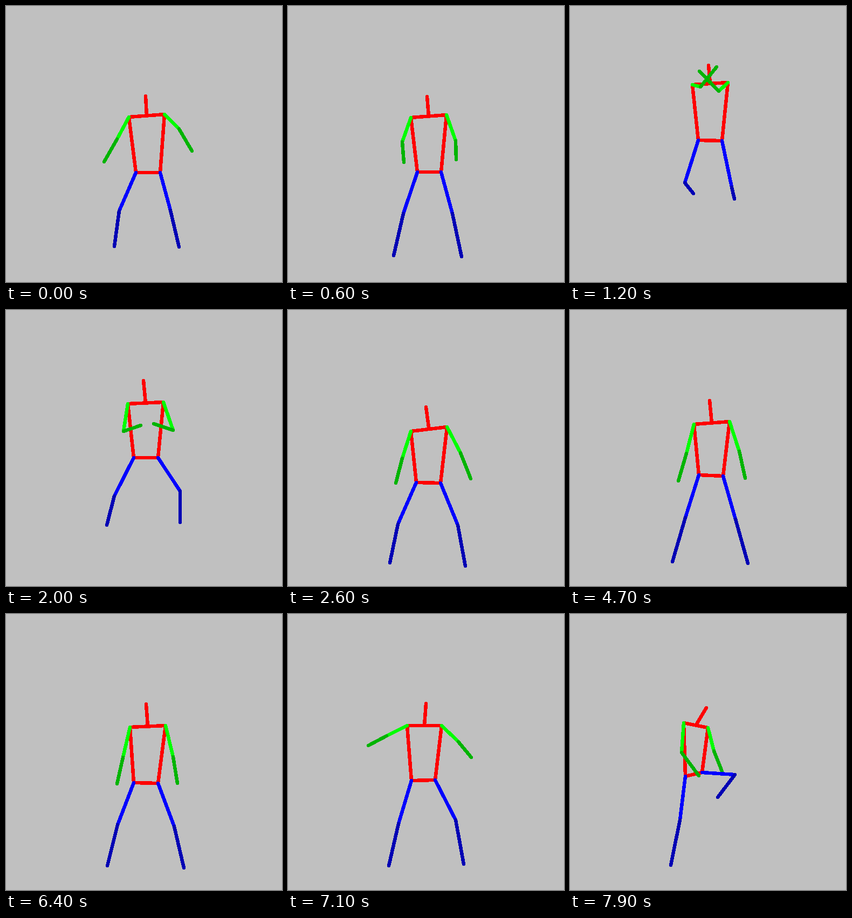
Animation of 512 by 512 pixels, one loop 8 s. Source, as an HTML page:

```html
<!DOCTYPE html>
<html lang="en">
<head>
<meta charset="utf-8">
<title>Stick figure</title>
<style>
  html, body { margin: 0; width: 100%; height: 100%; overflow: hidden; background: #c0c0c0; }
  svg { display: block; width: 100vw; height: 100vh; }
  line { stroke-width: 6.5; stroke-linecap: round; shape-rendering: crispEdges; }
</style>
</head>
<body>
<svg id="stage" viewBox="0 0 512 512"></svg>
<script>
const LOOP = 8000, STEP = 100;
const tracks = {};

// Ballistic height of the body during the jump.
const lift = t => Math.max(0, 62 * (1 - ((t - 1450) / 850) ** 2));

function addKey(joint, t, x, y) {
  (tracks[joint] ||= []).push({ t, x, y: y + lift(t) });
}

// Paired joints are given as left x, y, right x, y.
function pose(t, joints) {
  for (const [name, [x, y, x2, y2]] of Object.entries(joints)) {
    if (x2 === undefined) addKey(name, t, x, y);
    else {
      addKey(name + 'L', t, x, y);
      addKey(name + 'R', t, x2, y2);
    }
  }
}

pose(0, {
  head: [259, 167], shoulder: [228, 206, 294, 201], elbow: [206, 247, 321, 228],
  wrist: [182, 289, 345, 269], hip: [241, 309, 286, 309],
  knee: [210, 380, 305, 379], ankle: [201, 446, 321, 447]
});
pose(300, {
  head: [259, 186], shoulder: [229, 226, 294, 222], elbow: [207, 268, 319, 260],
  wrist: [200, 309, 325, 303], hip: [240, 322, 285, 322],
  knee: [207, 396, 310, 396], ankle: [198, 464, 323, 466]
});
pose(600, {
  head: [258, 168], shoulder: [228, 207, 294, 202], elbow: [212, 252, 311, 250],
  wrist: [215, 290, 312, 285], hip: [240, 308, 284, 308],
  knee: [214, 385, 305, 385], ankle: [196, 463, 322, 465]
});
pose(900, {
  head: [257, 130], shoulder: [227, 168, 293, 164], elbow: [222, 208, 303, 208],
  wrist: [245, 190, 268, 188], hip: [239, 271, 283, 271],
  knee: [215, 348, 300, 353], ankle: [197, 425, 318, 440]
});
pose(1200, {
  head: [257, 110], shoulder: [227, 146, 293, 142], elbow: [242, 150, 276, 158],
  wrist: [272, 113, 240, 121], hip: [238, 249, 282, 250],
  knee: [213, 328, 300, 336], ankle: [229, 348, 305, 358]
});
pose(2000, {
  head: [255, 131], shoulder: [226, 174, 292, 171], elbow: [218, 225, 310, 223],
  wrist: [250, 214, 274, 211], hip: [237, 274, 282, 274],
  knee: [201, 345, 323, 336], ankle: [187, 399, 323, 394]
});
pose(2300, {
  head: [256, 168], shoulder: [227, 212, 294, 207], elbow: [210, 262, 318, 258],
  wrist: [196, 300, 341, 290], hip: [238, 311, 283, 311],
  knee: [206, 387, 315, 385], ankle: [188, 462, 326, 468]
});
pose(2550, {
  head: [256, 181], shoulder: [228, 225, 295, 218], elbow: [212, 275, 320, 266],
  wrist: [200, 321, 340, 313], hip: [238, 321, 283, 322],
  knee: [204, 398, 315, 399], ankle: [189, 469, 329, 475]
});
pose(2900, {
  head: [255, 170], shoulder: [229, 215, 296, 205], elbow: [215, 269, 318, 253],
  wrist: [202, 320, 334, 305], hip: [239, 309, 284, 311],
  knee: [210, 387, 309, 391], ankle: [190, 468, 329, 471]
});
pose(3400, {
  head: [256, 167], shoulder: [229, 212, 296, 201], elbow: [218, 266, 317, 249],
  wrist: [203, 318, 331, 301], hip: [239, 305, 284, 307],
  knee: [213, 384, 306, 388], ankle: [191, 467, 328, 468]
});
pose(3700, { wrist: [203, 318, 333, 301] });
pose(4700, {
  head: [259, 168], shoulder: [230, 212, 296, 207], elbow: [216, 266, 314, 262],
  wrist: [201, 317, 325, 312], hip: [239, 306, 284, 308],
  knee: [214, 385, 307, 388], ankle: [190, 467, 330, 470]
});
pose(6400, {
  head: [260, 167], shoulder: [230, 210, 296, 207], elbow: [217, 266, 310, 265],
  wrist: [206, 315, 318, 314], hip: [237, 313, 282, 314],
  knee: [207, 391, 312, 394], ankle: [188, 467, 330, 471]
});
pose(6900, {
  head: [258, 168], shoulder: [226, 209, 292, 207], elbow: [186, 236, 333, 222],
  wrist: [149, 262, 368, 246], hip: [234, 312, 280, 312],
  knee: [206, 390, 312, 391], ankle: [188, 467, 331, 470]
});
pose(7200, {
  head: [255, 165], shoulder: [218, 205, 281, 207], elbow: [182, 224, 306, 244],
  wrist: [149, 240, 325, 276], hip: [226, 307, 268, 306],
  knee: [204, 388, 310, 374], ankle: [187, 467, 322, 458]
});
pose(7550, {
  head: [253, 159], shoulder: [213, 201, 266, 206], elbow: [190, 238, 283, 252],
  wrist: [182, 270, 300, 290], hip: [218, 302, 254, 298],
  knee: [203, 385, 312, 324], ankle: [187, 466, 298, 395]
});
pose(7900, {
  head: [253, 174], shoulder: [211, 202, 256, 211], elbow: [207, 257, 267, 254],
  wrist: [239, 300, 282, 292], hip: [214, 301, 245, 294],
  knee: [204, 382, 306, 298], ankle: [187, 466, 274, 340]
});

const slope = (a, b, axis) => (b[axis] - a[axis]) / (b.t - a.t);

// Harmonic mean of neighbouring slopes: smooth, with no overshoot.
function tangent(keys, i, axis) {
  if (i === 0) return slope(keys[0], keys[1], axis);
  if (i === keys.length - 1) return slope(keys[i - 1], keys[i], axis);
  const before = slope(keys[i - 1], keys[i], axis);
  const after = slope(keys[i], keys[i + 1], axis);
  return before * after > 0 ? 2 * before * after / (before + after) : 0;
}

function sample(keys, t, axis) {
  let i = 0;
  while (i < keys.length - 2 && t >= keys[i + 1].t) i++;
  const a = keys[i], b = keys[i + 1], span = b.t - a.t;
  const u = (t - a.t) / span, v = 1 - u;
  return v * v * (1 + 2 * u) * a[axis] + u * u * (3 - 2 * u) * b[axis]
    + span * u * v * (v * tangent(keys, i, axis) - u * tangent(keys, i + 1, axis));
}

const RED = '#f00', GREEN = '#0f0', DARK_GREEN = '#00b400', BLUE = '#00f', DARK_BLUE = '#0000b4';
const bones = [
  ['neck', 'head', RED], ['shoulderL', 'shoulderR', RED], ['shoulderL', 'hipL', RED],
  ['shoulderR', 'hipR', RED], ['hipL', 'hipR', RED],
  ['shoulderL', 'elbowL', GREEN], ['elbowL', 'wristL', DARK_GREEN],
  ['shoulderR', 'elbowR', GREEN], ['elbowR', 'wristR', DARK_GREEN],
  ['hipL', 'kneeL', BLUE], ['kneeL', 'ankleL', DARK_BLUE],
  ['hipR', 'kneeR', BLUE], ['kneeR', 'ankleR', DARK_BLUE]
].map(([from, to, color]) => {
  const line = document.createElementNS('http://www.w3.org/2000/svg', 'line');
  line.setAttribute('stroke', color);
  document.getElementById('stage').append(line);
  return { from, to, line };
});

function draw(t) {
  const joints = {};
  for (const name in tracks) {
    joints[name] = {
      x: Math.round(sample(tracks[name], t, 'x')),
      y: Math.round(sample(tracks[name], t, 'y') - lift(t))
    };
  }
  const { shoulderL: l, shoulderR: r } = joints;
  joints.neck = { x: (l.x + r.x) / 2, y: (l.y + r.y) / 2 };
  for (const { from, to, line } of bones) {
    const a = joints[from], b = joints[to];
    line.setAttribute('x1', a.x);
    line.setAttribute('y1', a.y);
    line.setAttribute('x2', b.x);
    line.setAttribute('y2', b.y);
  }
}

const start = performance.now();
function tick() {
  const t = (performance.now() - start) % LOOP;
  draw(Math.floor(t / STEP) * STEP);
  requestAnimationFrame(tick);
}
tick();
</script>
</body>
</html>
```
